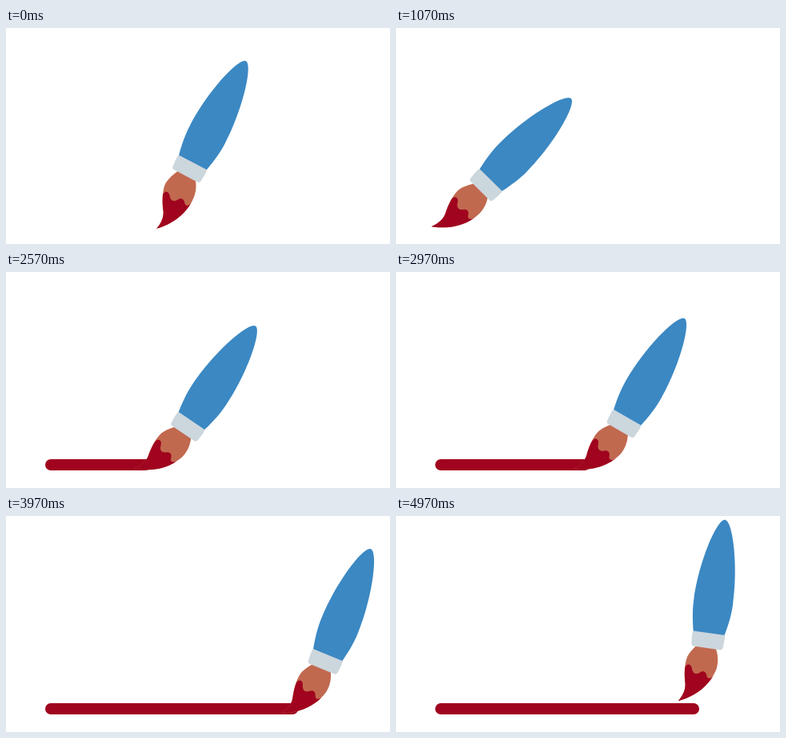
An HTML page for the animation above (5010 ms loop, 480 px wide and 270 px high).

```html
<!DOCTYPE html>
<html lang="en">
<head>
<meta charset="utf-8">
<title>Paintbrush</title>
<style>
  html, body { margin: 0; width: 100%; height: 100%; overflow: hidden; background: #fff; }
  svg { display: block; width: 100%; height: 100%; }
</style>
</head>
<body>
<svg viewBox="0 0 480 270">
  <path id="stroke" fill="none" stroke="#a0041e" stroke-width="14" stroke-linecap="round"/>
  <g id="brush">
    <path id="bristles" fill="#c1694f"/>
    <path id="paint" fill="#a0041e"/>
    <path fill="#3b88c3" d="M17.33 26.02C19.63 24.61 22.18 22.89 24.47 20.6C31.5 13.57 37.2 3.63 35.78 2.22C34.37 .8 24.43 6.5 17.4 13.53C15.11 15.82 13.39 18.37 11.98 20.67Z"/>
    <path fill="#ccd6dd" d="M12.41 19.85L18.15 25.59C17.5 26.6 16.6 27.1 15.9 27.8Q15.3 28.3 14.8 27.7L10.3 23.2Q9.7 22.7 10.2 22.1C10.9 21.4 11.4 20.5 12.41 19.85Z"/>
  </g>
</svg>
<script>
const LOOP = 5010, FRAME = 100 / 3, SCALE = 4.93;
const PIVOT = { x: 15.28, y: 22.72 };
const BEND = { from: 1, length: 8 };
const DRAW = { start: 1300, end: 4350, from: 56, to: 372, y: 241 };

const BRISTLES = 'M.43 34.74C.43 34.74 7.5 36.16 12.45 31.21C14.57 29.09 14.57 26.26 14.57 26.26' +
  'L11.74 23.43C11.74 23.43 8.21 24.14 6.79 25.55C5.38 26.97 4.27 29.78 3.9 31.15C3.23 33.65 .43 34.74 .43 34.74Z';
const PAINT = 'M11.23 32.26C10.04 33.03 9.4 32.39 9.62 31.65C9.84 30.9 9.5 30 8.38 30.24' +
  'C7.27 30.47 6.53 29.88 6.88 28.47C7.23 27.08 5.79 26.61 5.13 28.04C4.54 29.2 4.11 30.39 3.9 31.15' +
  'C3.23 33.65 .43 34.74 .43 34.74C.43 34.74 6.42 35.93 11.23 32.26Z';

// Ferrule position, brush angle and bristle bend in degrees
const POSES = [
  { t: 0,    x: 233.5, y: 168,   angle: -17.3, bend: -6.7 },
  { t: 1000, x: 118,   y: 189.5, angle: 0,     bend: 0 },
  { t: 1300, x: 122.7, y: 194,   angle: -3.4,  bend: 14 },
  { t: 4350, x: 415,   y: 172.7, angle: -23.8, bend: 14 },
  { t: 5000, x: 391,   y: 146,   angle: -37,   bend: 14 }
];

const byId = id => document.getElementById(id);
const clamp = (v, max = 1) => Math.min(max, Math.max(0, v));
const lerp = (a, b, u) => a + (b - a) * u;
const ease = (t, start, end) => {
  const u = clamp((t - start) / (end - start));
  return u * u * (3 - 2 * u);
};

function poseAt(t) {
  const next = Math.max(1, POSES.findIndex(p => p.t > t));
  const a = POSES[next - 1], b = POSES[next];
  const u = ease(t, a.t, b.t);
  const mix = key => lerp(a[key], b[key], u);
  return { x: mix('x'), y: mix('y'), angle: mix('angle'), bend: mix('bend') };
}

// Curves the bristles: an arc next to the ferrule, then straight on to the tip
function bendPath(path, degrees) {
  return path.replace(/([\d.]+) ([\d.]+)/g, (_, px, py) => {
    const x = px - PIVOT.x, y = py - PIVOT.y;
    const along = (y - x) / Math.SQRT2, across = (x + y) / Math.SQRT2;
    const arc = clamp(along - BEND.from, BEND.length);
    const tail = Math.max(0, along - BEND.from - BEND.length);
    const turn = degrees * Math.PI / 180 * arc / BEND.length;
    const a = Math.min(along, BEND.from) + arc * Math.cos(turn / 2) + tail * Math.cos(turn) + across * Math.sin(turn);
    const c = across * Math.cos(turn) - arc * Math.sin(turn / 2) - tail * Math.sin(turn);
    const bx = PIVOT.x + (c - a) / Math.SQRT2;
    const by = PIVOT.y + (c + a) / Math.SQRT2;
    return bx.toFixed(3) + ' ' + by.toFixed(3);
  });
}

function render(t) {
  const { x, y, angle, bend } = poseAt(t);
  byId('brush').setAttribute('transform',
    `translate(${x} ${y}) rotate(${angle}) scale(${SCALE}) translate(${-PIVOT.x} ${-PIVOT.y})`);
  byId('bristles').setAttribute('d', bendPath(BRISTLES, bend));
  byId('paint').setAttribute('d', bendPath(PAINT, bend));

  const end = lerp(DRAW.from, DRAW.to, ease(t, DRAW.start, DRAW.end));
  byId('stroke').setAttribute('d', t > DRAW.start ? `M${DRAW.from} ${DRAW.y}H${end}` : '');
}

const origin = performance.now();
function tick() {
  const t = (performance.now() - origin) % LOOP;
  render(Math.min(149, Math.floor((t + 5) / FRAME)) * FRAME);
  requestAnimationFrame(tick);
}
tick();
</script>
</body>
</html>
```
